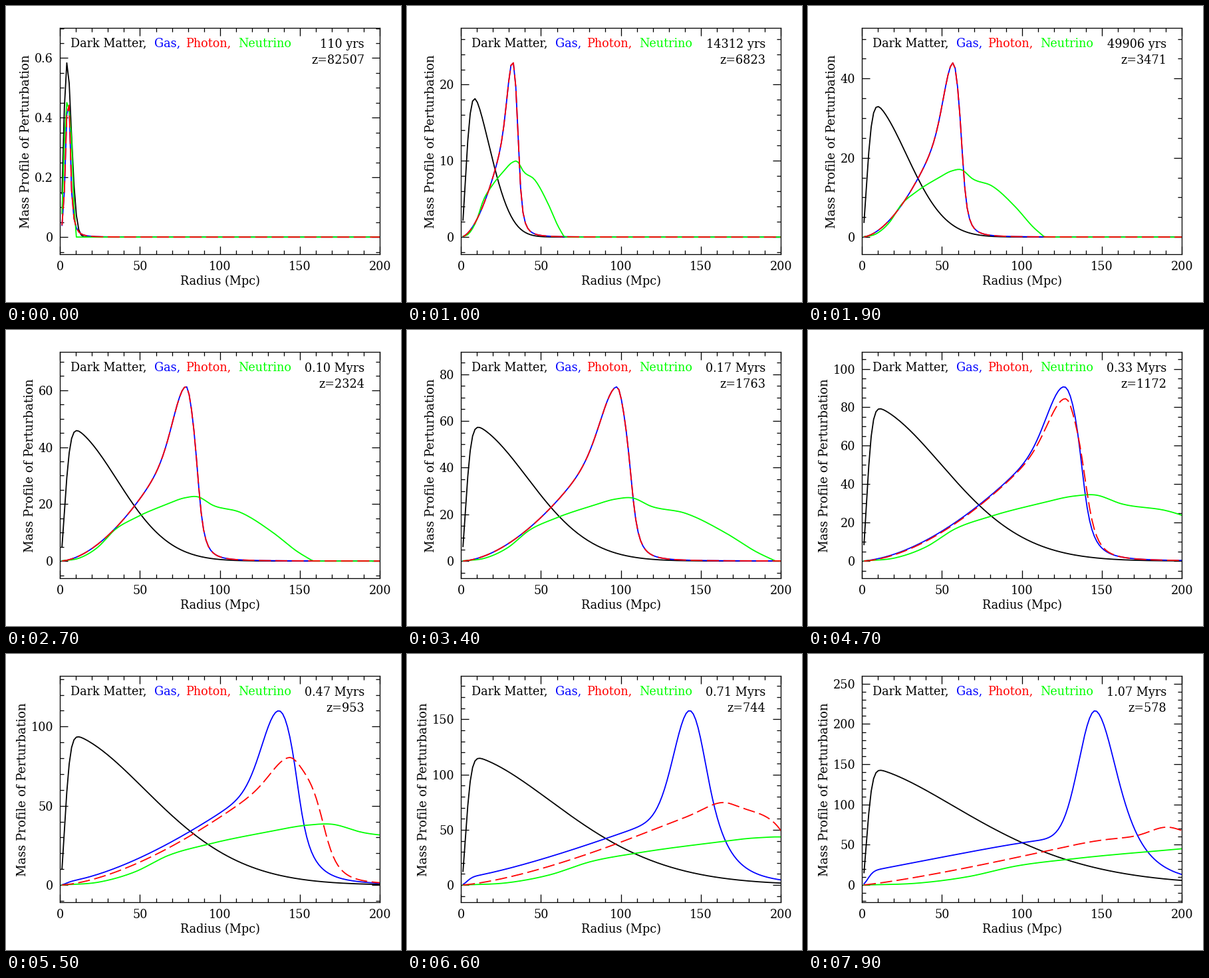
These frames come from a looping animation (594x446 px, 8 s). A matplotlib script:

```python
import numpy as np
import matplotlib.pyplot as plt
from matplotlib.animation import FuncAnimation

W, H, DPI = 594, 446, 64
PT = 72 / DPI                 # points per pixel
FRAMES, STEP_MS = 80, 100
SIZE = 17.6
LEFT, RIGHT, TOP, BOTTOM = 81.2, 562.2, 33.2, 374.4

plt.rcParams.update({"font.family": "DejaVu Serif", "font.size": SIZE * PT,
                     "axes.linewidth": 1.3 * PT})

radius = np.arange(1.25, 202, 1.5)


def sat(x, cap, q):
    """Follows x, then bends over to level off at cap."""
    return x / (1 + (x / cap) ** q) ** (1 / q)


def cutoff(x):
    """Soft step from 1 down to 0 with long tails."""
    return .5 - .5 * x / np.sqrt(1 + x * x)


def smooth(x, xp, fp):
    """Cubic Hermite curve through a few points, held constant outside."""
    xp, fp = np.array(xp), np.array(fp)
    m = np.gradient(fp, xp)
    x = np.clip(x, xp[0], xp[-1])
    i = np.clip(np.searchsorted(xp, x) - 1, 0, len(xp) - 2)
    h = xp[i + 1] - xp[i]
    t = (x - xp[i]) / h
    return (fp[i] * (1 + 2 * t) * (1 - t) ** 2 + fp[i + 1] * t * t * (3 - 2 * t)
            + h * t * (1 - t) * (m[i] * (1 - t) - m[i + 1] * t))


def dark_matter(eta):
    """Steep fixed core with an outer slope that stretches outwards."""
    reach = np.hypot(2.2 * eta / (1 + eta / 101), 6)
    y = (1 - np.exp(-(radius / 4.4) ** 1.75)) \
        * np.exp(-(radius / reach) ** (2.3 - .008 * eta))
    top = eta * (1.635 + 6.6e-5 * (eta - 33) ** 2) * (1 - np.exp(-.42 * eta))
    return top * y / y.max()


def neutrino(eta):
    """Self-similar hump that widens at the speed of light."""
    u = [0, .08, .15, .22, .3, .42, .5, .55, .61, .72, .85, .95, 1.01]
    h = [0, .05, .21, .485, .665, .865, .975, .99, .86, .75, .44, .14, 0]
    top = .99 * eta / (1 + eta / 130) * (1 - np.exp(-.7 * eta))
    return top * smooth(radius / (5.45 * eta + 4), u, h)


def gas_and_photon(eta):
    """One sound wave until decoupling; then gas stalls and light runs on."""
    free = np.clip((eta - 44) / 36, 0, 1)
    start = 1 - np.exp(-.27 * eta)
    sound = sat(2.75 * eta + 2, 148, 7)
    ramp = start * (sat(1.75 * eta, 82, 7) - 25 * free)
    crest = start * sat(2.21 * eta, 92, 7)
    infall = 4.5 * 3 * np.log1p(np.exp((eta - 52.5) / 3))
    run = free ** 1.8

    def wave(top, centre, front, edge, tail, power, core):
        def base(r):
            inner = core * (1 - np.exp(-(r / 5) ** 2))
            slope = ramp * (sat(r, 1.05 * sound, 16) / sound) ** power
            return (inner + slope) * cutoff((r - front) / edge)

        d = radius - centre
        rise = np.exp(-.5 * (d / min(.1 * sound, 10.5)) ** 2)
        fall = (1 + (d / tail) ** 2) ** -1.5
        return base(radius) + (top - base(centre)) * np.where(d < 0, rise, fall)

    front, edge, tail = 1 + 1.08 * sound, 1 + .04 * sound, 3 + .04 * sound
    gas = wave(crest + infall * start, sound, front - .135 * sound * free ** 3,
               edge + 8 * free ** 2, tail + 14 * free ** .5,
               1.75 - .75 * free, 15.5 * free ** 2)
    photon = wave(crest - 20 * np.sin(np.pi / 2 * free), sound + 44 * run,
                  front + 110 * run, edge + 10 * free, tail + 8 * free,
                  1.75 - .55 * free, 0)
    return gas, photon


def epoch(n):
    """Redshift and age; steps are even in conformal time."""
    a0, a1, a2 = 1 / 82508, 1.2245e-5, 1.198e-7
    z = 1 / (a0 + a1 * n + a2 * n * n) - 1
    rate = 1.8345e7 - 2000 * (n - 19)
    return z, 110 + rate * (a0 * n + a1 * n ** 2 / 2 + a2 * n ** 3 / 3)


def tick_steps(span):
    """Major and minor spacing for an axis of this span."""
    goal = np.log10(span / 4)
    steps = [(m * 10.0 ** e, s * 10.0 ** e) for e in range(-2, 4)
             for m, s in ((1, .2), (2, .5), (5, 1))]
    return min(steps, key=lambda p: abs(np.log10(p[0]) - goal))


fig = plt.figure(figsize=(W / DPI, H / DPI), dpi=DPI, facecolor="white")
ax = fig.add_axes([LEFT / W, 1 - BOTTOM / H, (RIGHT - LEFT) / W, (BOTTOM - TOP) / H])
ax.set_xlim(0, 200)
ax.set_xticks(range(0, 201, 50))
ax.set_xticks(range(0, 201, 10), minor=True)
ax.tick_params(which="both", direction="in", top=True, right=True, width=1.3 * PT)
ax.tick_params(which="major", length=12 * PT)
ax.tick_params(which="minor", length=6 * PT)
ax.tick_params(axis="x", pad=9.5 * PT)
ax.tick_params(axis="y", pad=10 * PT)


def label(x, y, text, **kw):
    return fig.text(x / W, 1 - y / H, text, va="baseline", **kw)


BLACK, BLUE, GREEN, RED = "#000000", "#0000ff", "#00ff00", "#ff0000"
label(97, 61, "Dark Matter,", color=BLACK)
label(223, 61, "Gas,", color=BLUE)
label(270, 61, "Photon,", color=RED)
label(349, 62, "Neutrino", color=GREEN)
label(322, 419.5, "Radius (Mpc)", ha="center")
ylabel = label(41, 204, "Mass Profile of Perturbation", ha="center", rotation=90,
               rotation_mode="anchor", fontsize=18.3 * PT)
age_text = label(539, 63, "", ha="right")
z_text = label(539, 87, "", ha="right")

lines = [ax.plot([], [], color=c, lw=1.8 * PT, ls=ls, zorder=3, dash_capstyle="butt")[0]
         for c, ls in ((BLACK, "-"), (BLUE, "-"), (GREEN, "-"), (RED, (0, (10, 3.7))))]


def update(n):
    eta = n + 1.0
    gas, photon = gas_and_photon(eta)
    curves = np.array([dark_matter(eta), gas, neutrino(eta), photon])
    for line, y in zip(lines, curves):
        line.set_data(radius, np.maximum(y, 0))

    peak = curves.max()
    low, high = -.1 * peak, 1.2 * peak
    major, minor = tick_steps(high - low)
    ticks = np.arange(0, high, major)
    names = [f"{v:.6g}" for v in ticks]
    ax.set_yticks(ticks, names)
    ax.set_yticks(np.arange(np.ceil(low / minor), high / minor) * minor, minor=True)
    ax.set_ylim(low, high)

    # the axis title keeps clear of the widest tick label
    widest = max(11.2 * len(s) - 5.6 * ("." in s) for s in names)
    ylabel.set_x((63.4 - widest) / W)

    z, age = epoch(n)
    age_text.set_text(f"{age:.0f} yrs" if age < 1e5 else f"{age / 1e6:.2f} Myrs")
    z_text.set_text(f"z={z:.0f}")
    return lines


anim = FuncAnimation(fig, update, frames=FRAMES, interval=STEP_MS, repeat=True,
                     repeat_delay=0, blit=False)
plt.show()
```
